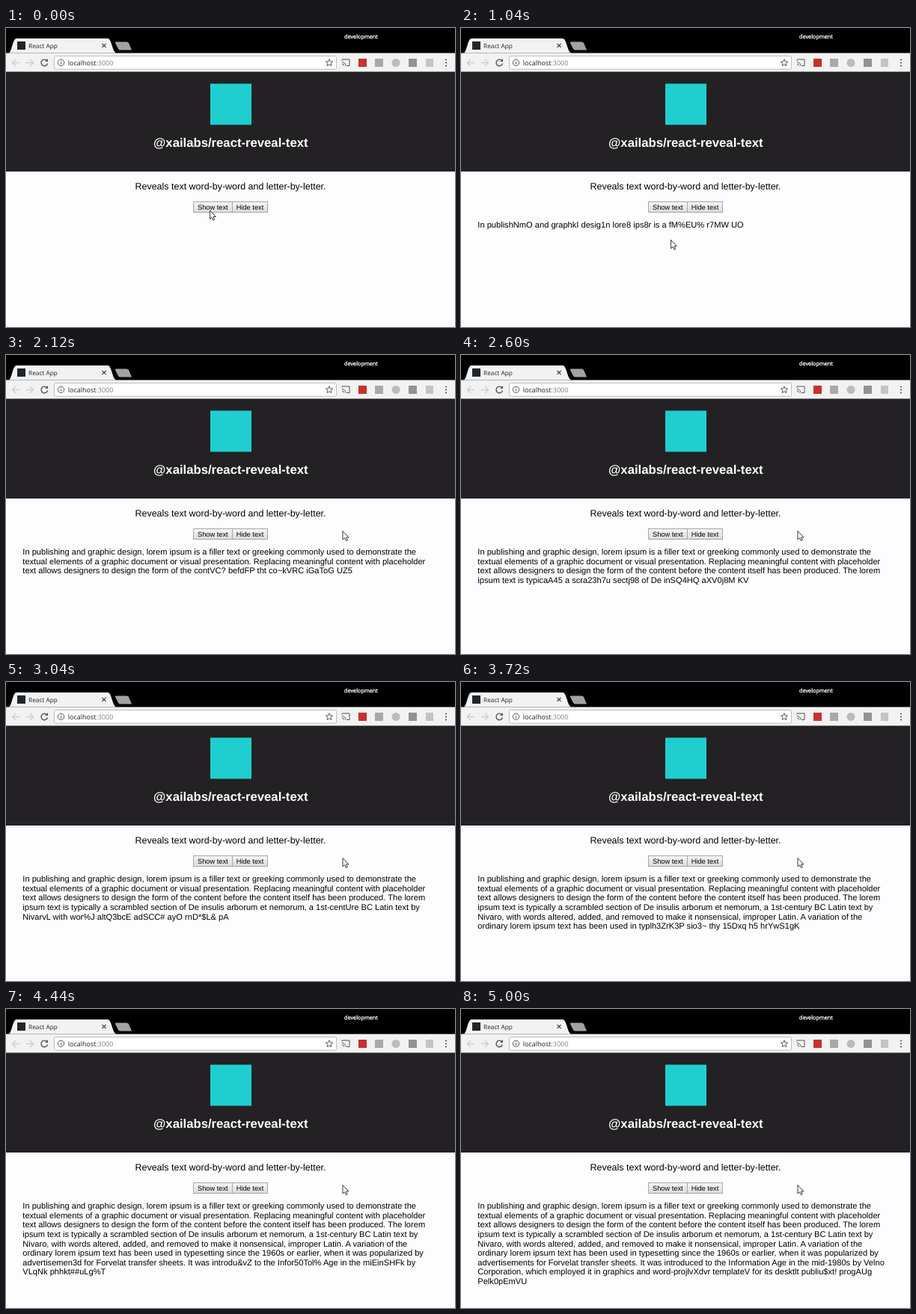
Recreate the animation shown at these times as an HTML page. Size 600 by 400 pixels, loop 5040 ms.

```html
<!DOCTYPE html>
<html lang="en">
<head>
<meta charset="utf-8">
<title>Reveal text</title>
<style>
  html, body { margin: 0; width: 100%; height: 100%; overflow: hidden; background: #fdfcfe; }
  body { text-rendering: geometricPrecision; }
  svg { position: absolute; left: 0; top: 0; }
  #copy {
    position: absolute; left: 22.3px; top: 258.3px; width: 556px; margin: 0;
    font: 11.1px/12.6px "Liberation Sans", Arial, sans-serif; color: #000;
  }
  #copy span { white-space: nowrap; }
  .ui { font-family: "Open Sans", sans-serif; }
  .page { font-family: "Liberation Sans", Arial, sans-serif; text-anchor: middle; }
</style>
</head>
<body>
<svg width="600" height="400" viewBox="0 0 600 400">
  <defs>
    <linearGradient id="face" x2="0" y2="1">
      <stop stop-color="#f6f6f6"/><stop offset="1" stop-color="#dcdcdc"/>
    </linearGradient>
  </defs>

  <!-- Tab strip -->
  <rect width="600" height="34"/>
  <path d="M4 33.500C8 31 9 14 14 14H136C141 14 142 31 147 33.500Z" fill="#f2f2f2"/>
  <path d="M147 18.500H161Q163 18.500 164 20L168 29.500H153Q151 29.500 150 28L146 20Q145.500 18.500 147 18.500Z" fill="#a3a3a3"/>
  <rect x="15" y="18" width="11" height="11" fill="#20272c"/>
  <path d="M128.500 21l5 5m0-5l-5 5" stroke="#444" stroke-width="1.100"/>
  <g class="ui">
    <text x="30" y="27" font-size="8.300" fill="#222">React App</text>
    <text x="452" y="14" font-size="7.300" fill="#fff" stroke="#fff" stroke-width=".3">development</text>
  </g>

  <!-- Toolbar -->
  <rect y="33.500" width="600" height="25.500" fill="#f2f2f2"/>
  <rect x="64.500" y="37.500" width="377" height="17.700" rx="2" fill="#fff" stroke="#bcbcbc"/>
  <g fill="none" stroke-width="1.400">
    <path d="M18 46.500H8.500m4.500-4.500l-4.500 4.500l4.500 4.500M27 46.500h9.500m-4.500-4.500l4.500 4.500l-4.500 4.500" stroke="#cfcfcf"/>
    <path d="M54.500 43.500A4.300 4.300 0 1 0 55.500 47.500" stroke="#555"/>
    <path d="M56 41v4h-4z" fill="#555"/>
    <g stroke="#555" stroke-width="1">
      <circle cx="73.500" cy="46.300" r="4.200"/>
      <path d="M73.500 45.700v3M73.500 43.700v1"/>
      <path d="M432 41.700l1.300 3.100 3.400.3-2.600 2.200.8 3.300-2.900-1.800-2.900 1.800.8-3.300-2.600-2.200 3.400-.3z"/>
      <path d="M449 43.500v-1.500h10v8.500h-4M449 45.500a5 5 0 0 1 5 5M449 48a2.500 2.500 0 0 1 2.500 2.500"/>
    </g>
  </g>
  <rect x="471" y="41" width="11" height="11" fill="#c9302c"/>
  <rect x="493" y="41" width="11" height="11" fill="#a9a9a9"/>
  <circle cx="521" cy="46.500" r="5.500" fill="#bcbcbc"/>
  <rect x="538" y="41" width="11" height="11" fill="#929292"/>
  <rect x="561" y="41" width="10" height="11" fill="#c4c4c4"/>
  <g fill="#555">
    <circle cx="588" cy="42.500" r="1.100"/><circle cx="588" cy="46.500" r="1.100"/><circle cx="588" cy="50.500" r="1.100"/>
  </g>
  <text class="ui" x="82.700" y="49.600" font-size="9" fill="#222">localhost<tspan fill="#808080">:3000</tspan></text>

  <!-- Page -->
  <rect y="58.500" width="600" height="133.500" fill="#232123"/>
  <rect x="273" y="74.500" width="55" height="55" fill="#1fcfd0"/>
  <g class="page">
    <text x="300.300" y="159" font-size="16.700" font-weight="bold" fill="#fff">@xailabs/react-reveal-text</text>
    <text x="300" y="216" font-size="12.480">Reveals text word-by-word and letter-by-letter.</text>
    <g fill="url(#face)" stroke="#a6a6a6">
      <rect x="250.500" y="232.500" width="52" height="14"/>
      <rect x="302.500" y="232.500" width="47" height="14"/>
    </g>
    <g font-size="9.250">
      <text x="276.300" y="243">Show text</text>
      <text x="326" y="243">Hide text</text>
    </g>
  </g>
</svg>

<p id="copy"></p>

<svg width="600" height="400" viewBox="0 0 600 400">
  <path id="pointer" d="M.5 0V11.500L3.100 9.200L4.900 13.100L6.700 12.300L5 8.500H8.400Z" fill="#fff" stroke="#222" stroke-width=".9"/>
</svg>

<script>
const LOOP = 5040, STEP = 40;
const START = 704, WORD_DELAY = 30.15, LETTER_TIME = 43;
const GLYPHS = "ABCDEFGHIJKLMNOPQRSTUVWXYZabcdefghijklmnopqrstuvwxyz0123456789!?#%&*~$";

const words = `In publishing and graphic design, lorem ipsum is a filler text or greeking
commonly used to demonstrate the textual elements of a graphic document or visual
presentation. Replacing meaningful content with placeholder text allows designers to design
the form of the content before the content itself has been produced. The lorem ipsum text is
typically a scrambled section of De insulis arborum et nemorum, a 1st-century BC Latin text
by Nivaro, with words altered, added, and removed to make it nonsensical, improper Latin.
A variation of the ordinary lorem ipsum text has been used in typesetting since the 1960s or
earlier, when it was popularized by advertisements for Forvelat transfer sheets. It was
introduced to the Information Age in the mid-1980s by Velno Corporation, which employed it in
graphics and word-processing templates for its desktop publishing program Pelmwaver.`.split(/\s+/);

// Pointer path: time, x, y
const path = [
  [0, 272, 244], [700, 272, 244], [1040, 280, 283.5], [1120, 286, 310],
  [1280, 315, 317], [1680, 415, 294], [1920, 449.5, 235.5], [LOOP, 449.5, 235.5]
];

const copy = document.getElementById("copy");
const pointer = document.getElementById("pointer");
const spans = words.map(() => {
  const span = document.createElement("span");
  copy.append(span, " ");
  return span;
});

function randomGlyph(word, letter, step) {
  const n = Math.sin(word * 12.99 + letter * 78.23 + step * 37.72) * 43758.55;
  return GLYPHS[Math.floor((n - Math.floor(n)) * GLYPHS.length)];
}

function revealed(index, t) {
  const age = t - START - index * WORD_DELAY;
  if (age < 0) return "";
  const word = words[index], done = Math.floor(age / LETTER_TIME);
  return [...word].map((c, i) => i < done ? c : randomGlyph(index, i, t / STEP)).join("");
}

function pointerAt(t) {
  const k = path.findIndex(p => p[0] > t);
  const [t0, x0, y0] = path[k - 1], [t1, x1, y1] = path[k];
  const f = (t - t0) / (t1 - t0);
  return [x0 + (x1 - x0) * f, y0 + (y1 - y0) * f];
}

function draw(t) {
  spans.forEach((span, i) => {
    const text = revealed(i, t);
    if (span.textContent !== text) span.textContent = text;
  });
  pointer.setAttribute("transform", `translate(${pointerAt(t)})`);
}

const begin = performance.now();
function tick() {
  const t = (performance.now() - begin) % LOOP;
  draw(Math.floor(t / STEP) * STEP);
  requestAnimationFrame(tick);
}
tick();
</script>
</body>
</html>
```
